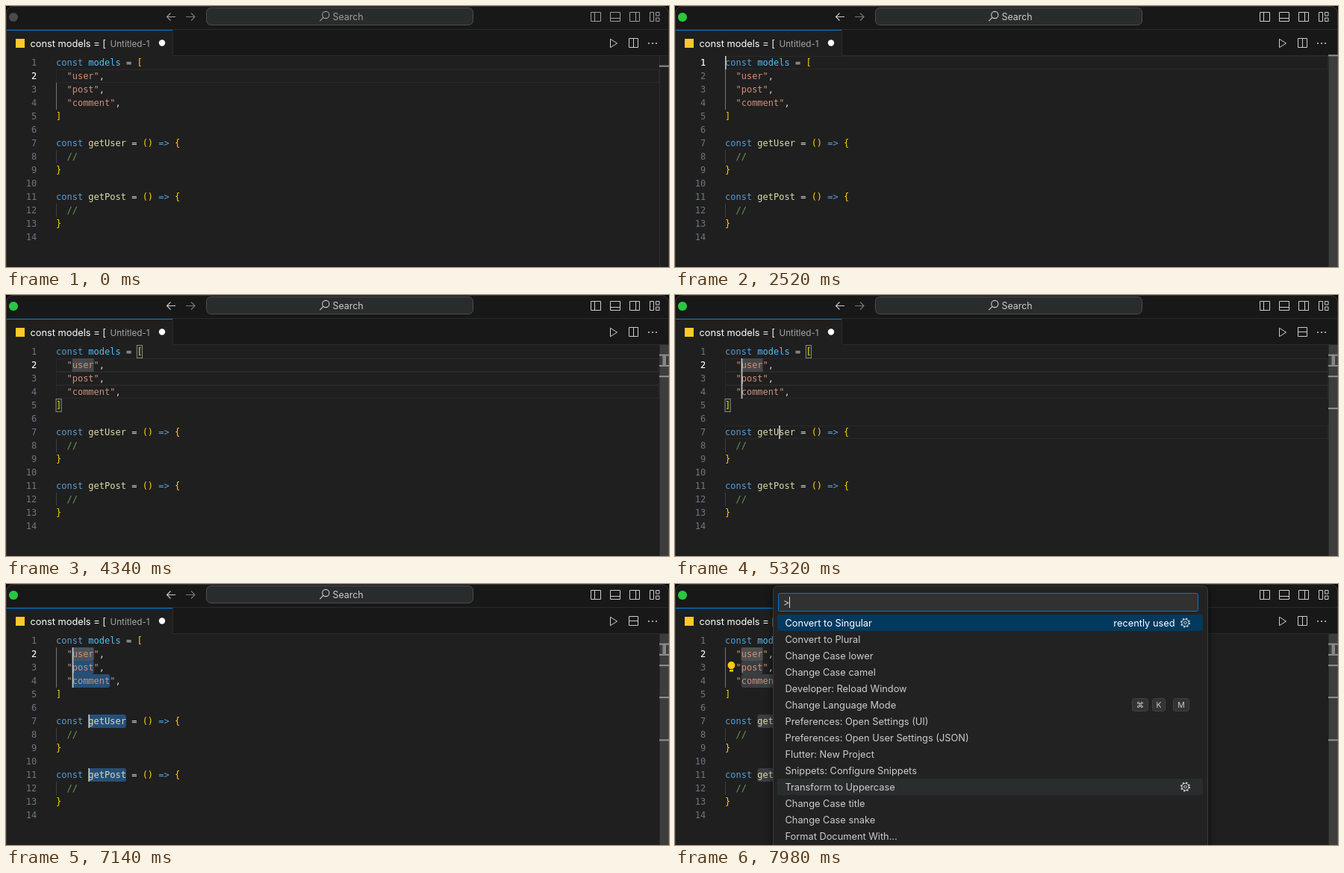
An HTML page for the animation above (8 s loop, 888 by 350 pixels).

```html
<!DOCTYPE html>
<html lang="en">
<head>
<meta charset="utf-8">
<title>Multi-cursor editing</title>
<style>
  html, body { margin: 0; width: 100%; height: 100%; overflow: hidden; background: #0b0b0b; }
  svg { display: block; width: 888px; height: 350px; --chrome: #ccc; }
  svg.blurred { --chrome: #9d9d9d; }
  text { white-space: pre; font: 12.8px Inter, sans-serif; fill: #ccc; }
  .code text { font: 12px "DejaVu Sans Mono", monospace; fill: #d4d4d4; }
  .code .number { fill: #6e7681; text-anchor: end; }
  .code .active { fill: #fff; }
  .keyword { fill: #569cd6; } .constant { fill: #4fc1ff; } .function { fill: #dcdcaa; }
  .string { fill: #ce9178; } .bracket { fill: #ffd700; } .comment { fill: #6a9955; }
  .icon { fill: none; stroke: #ccc; }
  .chrome { stroke: var(--chrome); }
  .key { fill: #333; stroke: #404040; }
  .small { font-size: 10.5px; text-anchor: middle; }
</style>
</head>
<body>
<svg id="stage" viewBox="0 0 888 350">
  <defs>
    <g id="gear" class="icon">
      <circle r="5.5" stroke-width="2" stroke-dasharray="2.16 2.16"/>
      <circle r="4.6"/>
      <circle r="1.8"/>
    </g>
  </defs>
  <rect x=".5" y=".5" width="887" height="370" rx="9" fill="#181818" stroke="#393939"/>
  <path d="M1 67H223V33H1ZM1 67H887V350H1Z" fill="#1f1f1f"/>
  <path d="M1 31.5H887M223.5 32V66.5H887" fill="none" stroke="#2b2b2b"/>
  <path d="M1 32.5H223" stroke="#0078d4"/>

  <!-- title bar -->
  <circle cx="10" cy="15" r="6" fill="#4a4a4a"/>
  <circle cx="10" cy="15" r="6" fill="#28c840" data-on="1680-8000"/>
  <path class="icon chrome" stroke-width="1.1" d="M227 14.5H215.500M220.500 9.500L215.500 14.500L220.500 19.500"/>
  <path class="icon" stroke="#777" style="stroke:#777" stroke-width="1.1" d="M241 14.500H253M248 9.500L253 14.500L248 19.500"/>
  <rect x="268.500" y="2.500" width="357" height="23" rx="6" fill="#292c2c" stroke="#4b4e4e"/>
  <g class="icon chrome" stroke-width="1.1">
    <circle cx="428.300" cy="12" r="4.600"/>
    <path d="M425 15.300L420.300 20.200"/>
  </g>
  <text x="437.500" y="18.700" style="font-size:12.4px;fill:var(--chrome)">Search</text>
  <path class="icon chrome" d="M783.500 8.500h13v12h-13zM788.500 8.500v12M809.500 8.500h13v12h-13zM809.500 16.500h13
    M835.500 8.500h13v12h-13zM843.500 8.500v12M862.500 8.500h5v12h-5zM870.500 8.500h4.500v4.500h-4.500zM870.500 16h4.500v4.500h-4.500z"/>

  <!-- tab -->
  <rect x="13" y="44" width="12" height="12" fill="#ffca28"/>
  <text x="32.500" y="54.500" style="fill:#fff">const models = [</text>
  <text x="139.500" y="54.500" style="font-size:11.7px;fill:#a5a5a5">Untitled-1</text>
  <circle cx="209" cy="49.500" r="4.200" fill="#fff"/>
  <path class="icon" d="M809.500 44.300V55.700L818.500 50ZM834.500 43.500h12v12h-12z"/>
  <path class="icon" d="M840.500 43.500v12" data-on="0-3500 3780-4830 7280-8000"/>
  <path class="icon" d="M834.500 49.500h12" data-on="3500-3780 4830-7280"/>
  <g fill="#ccc"><circle cx="861" cy="50" r="1"/><circle cx="866" cy="50" r="1"/><circle cx="871" cy="50" r="1"/></g>

  <!-- editor -->
  <path d="M67.500 85V139M67.500 193V211M67.500 265V283" stroke="#404040"/>
  <path d="M67.500 85V139" stroke="#757575" data-on="0-1680 2520-8000"/>
  <g id="marks"></g>
  <g id="code" class="code"></g>
  <g id="cursors" fill="#c4c5c3"></g>
  <g data-on="7420-8000">
    <circle cx="75.500" cy="109" r="4.900" fill="#fc0"/>
    <path d="M73 112h5v5.500h-5z" fill="#fc0"/>
    <path d="M73 114.500h5" stroke="#1f1f1f"/>
  </g>
  <rect id="slider" x="875" y="67" width="13" height="283" fill="#797979" fill-opacity=".34"/>
  <path d="M875.500 67V350" stroke="#2b2b2b"/>
  <g id="ruler"></g>

  <!-- command palette -->
  <g data-on="7980-8000">
    <rect x="131.500" y="2.500" width="582" height="370" rx="6" fill="#222" stroke="#3c3c3c"
      style="filter:drop-shadow(0 0 4px #000a)"/>
    <rect x="138.500" y="12.500" width="562" height="24" rx="2" fill="#313131" stroke="#0078d4"/>
    <text x="145" y="29">&gt;</text>
    <path d="M153.500 17V32" stroke="#ddd"/>
    <rect x="137" y="41" width="570" height="22" rx="3" fill="#04395e"/>
    <rect x="137" y="261" width="570" height="22" rx="3" fill="#2a2d2e"/>
    <g id="commands"></g>
    <text x="669.500" y="56.600" text-anchor="end" style="fill:#fff">recently used</text>
    <use href="#gear" x="683.500" y="52"/>
    <use href="#gear" x="683.500" y="272"/>
    <rect class="key" x="612.500" y="153.500" width="21" height="17" rx="3"/>
    <rect class="key" x="639.500" y="153.500" width="17" height="17" rx="3"/>
    <rect class="key" x="667.500" y="153.500" width="21" height="17" rx="3"/>
    <text class="small" x="623" y="166" style="font-family:'DejaVu Sans',sans-serif">⌘</text>
    <text class="small" x="648" y="166">K</text>
    <text class="small" x="678" y="166">M</text>
  </g>
</svg>
<script>
const LOOP = 8000, LEFT = 67, TOP = 67, CHAR = 7.224, LINE = 18;
const $ = id => document.getElementById(id);
const colX = col => LEFT + col * CHAR;
const lineY = line => TOP + (line - 1) * LINE;

function add(parent, tag, attrs, markup = '') {
  const el = document.createElementNS('http://www.w3.org/2000/svg', tag);
  for (const name in attrs) el.setAttribute(name, attrs[name]);
  el.innerHTML = markup;
  return $(parent).appendChild(el);
}
// A box covering `length` characters, shown during the given spans
const mark = (line, col, length, on, style) => add('marks', 'rect', {
  x: colX(col), y: lineY(line), width: length * CHAR, height: LINE, 'data-on': on, ...style });

const source = `const models = [
  "user",
  "post",
  "comment",
]

const getUser = () => {
  //
}

const getPost = () => {
  //
}
`.split('\n');
const kinds = ['keyword', 'constant', 'function', 'string', 'bracket', 'comment'];
const token = /(const|=>)|(models)|(get\w+)|("\w+")|([[\](){}])|(\/\/)/g;
const paint = (text, ...groups) => `<tspan class="${kinds[groups.findIndex(g => g)]}">${text.replace('>', '&gt;')}</tspan>`;
const active = { 1: '2520-3220', 2: '0-1680 3220-8000', 14: '1680-2520' };

source.forEach((text, i) => {
  const line = i + 1, y = lineY(line) + 13;
  add('code', 'text', { x: LEFT, y }, text.replace(token, paint));
  add('code', 'text', { x: 41.3, y, class: 'number' }, line);
  if (active[line]) add('code', 'text', { x: 41.3, y, class: 'number active', 'data-on': active[line] }, line);
});

// Lines that hold a cursor: [line, spans]
const current = [[1, '2520-3220'], [2, '0-1680 3220-8000'], [3, '3570-8000'], [4, '3850-8000'],
  [7, '5320-8000'], [11, '6020-8000'], [14, '1680-2520']];
for (const [line, on] of current) {
  add('marks', 'rect', { x: 67.5, y: lineY(line) + .5, width: 807, height: 17, fill: 'none',
    stroke: '#292929', 'data-on': on.replace('-8000', '-7140') });
  add('ruler', 'rect', { x: 875, y: 65.3 + 14.3 * (line - 1), width: 13, height: 2, fill: '#929292', 'data-on': on });
}
add('ruler', 'rect', { x: 879.5, y: 81, width: 4.5, height: 14, fill: '#868686', 'data-on': '3220-8000' });

for (const [line, col, length] of [[2, 3, 4], [3, 3, 4], [4, 3, 7], [7, 6, 7], [11, 6, 7]]) {
  mark(line, col, length, '7140-7980', { fill: '#264f78', rx: 3 });
  mark(line, col, length, '7980-8000', { fill: '#3a3d41', rx: 3 });
}
mark(2, 3, 4, '3220-8000', { fill: '#575757', 'fill-opacity': .72 });
for (const [line, col] of [[1, 15], [5, 0]])
  mark(line, col, 1, '3220-7140', { y: lineY(line) + .5, height: 17, fill: '#1d2a1d', stroke: '#888' });

// Cursors: [line, column, spans]
const later = ' 6020-6510 6930-7140', all = ' 4830-5880' + later, atStart = '7140-7630';
const cursors = [[14, 0, '1680-2240'],
  [1, 0, '2520-2660'], [1, 1, '2660-2800'], [1, 2, '2800-3010'], [1, 3, '3010-3220'],
  [2, 3, '3220-4270' + all], [3, 3, '3570-4270' + all], [4, 3, '3850-4270' + all],
  [7, 10, '5320-5880' + later], [11, 10, later.trim()],
  [2, 3, atStart], [3, 3, atStart], [4, 3, atStart], [7, 6, atStart], [11, 6, atStart]];
for (const [line, col, on] of cursors)
  add('cursors', 'rect', { x: colX(col), y: lineY(line), width: 1.7, height: LINE, 'data-on': on });

['Convert to Singular', 'Convert to Plural', 'Change Case lower', 'Change Case camel',
  'Developer: Reload Window', 'Change Language Mode', 'Preferences: Open Settings (UI)',
  'Preferences: Open User Settings (JSON)', 'Flutter: New Project', 'Snippets: Configure Snippets',
  'Transform to Uppercase', 'Change Case title', 'Change Case snake', 'Format Document With...'
].forEach((name, i) => add('commands', 'text',
  { x: 147.5, y: 56.6 + 22 * i, style: i ? '' : 'fill:#fff' }, name));

const timed = [...document.querySelectorAll('[data-on]')].map(el =>
  [el, el.dataset.on.split(' ').map(span => span.split('-').map(Number))]);

function render(now) {
  const t = now % LOOP;
  for (const [el, spans] of timed)
    el.style.display = spans.some(([from, to]) => t >= from && t < to) ? '' : 'none';
  $('stage').classList.toggle('blurred', t < 1680);
  $('slider').style.opacity = Math.min(1, Math.max(0, (t - 1680) / 140));
}
function tick() {
  render(performance.now());
  requestAnimationFrame(tick);
}
tick();
</script>
</body>
</html>
```
